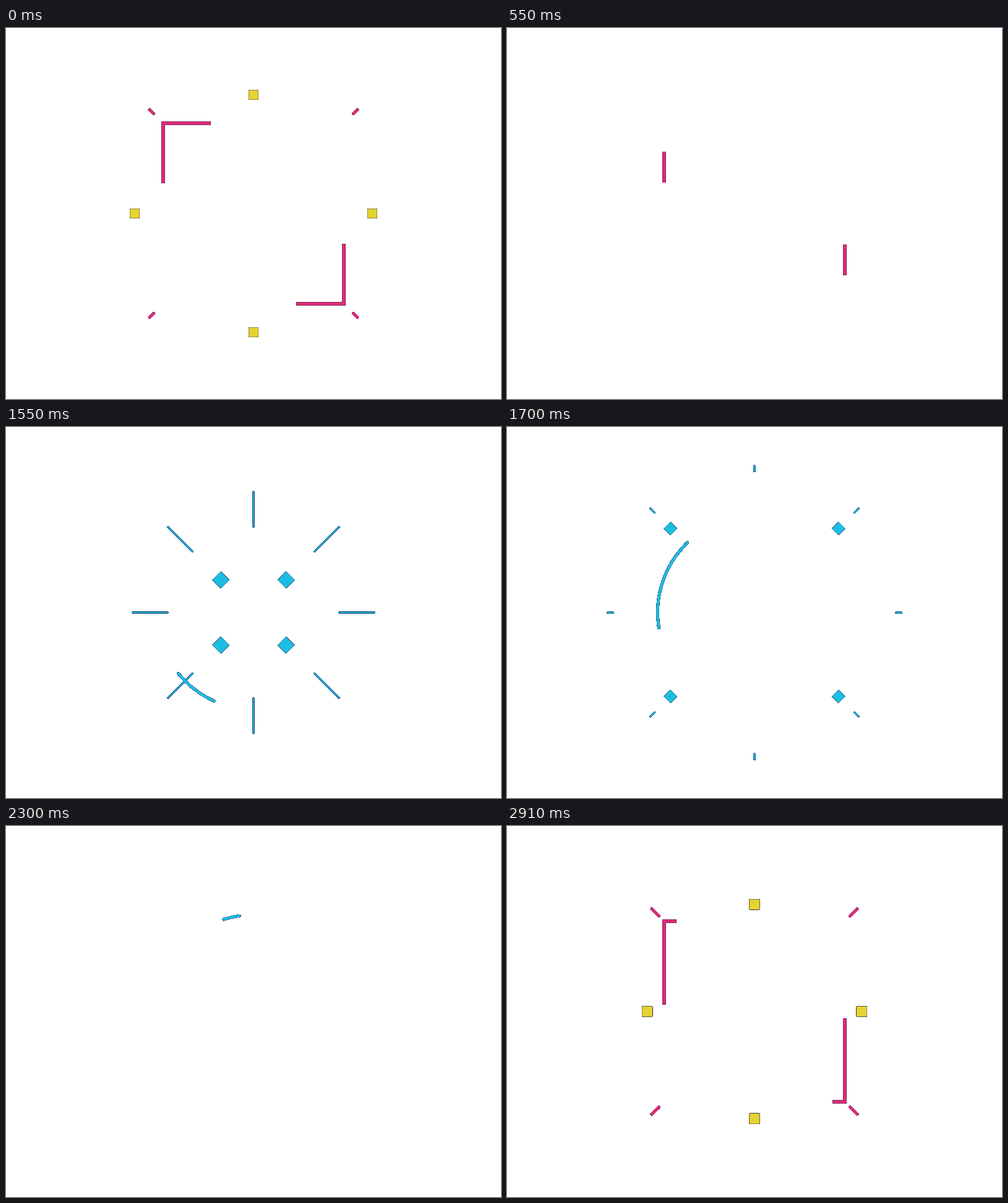
Recreate the animation shown at these times as an HTML page with a canvas. Size 800 by 600 pixels, loop 2940 ms.

```html
<!DOCTYPE html>
<html lang="en">
<head>
<meta charset="utf-8">
<title>Line bursts</title>
<style>
  html, body { margin: 0; width: 100%; height: 100%; overflow: hidden; background: #fff; }
  canvas { display: block; }
</style>
</head>
<body>
<canvas id="stage" width="800" height="600"></canvas>
<script>
const ctx = document.getElementById('stage').getContext('2d', { willReadFrequently: true });
const LOOP = 2940, SCENE = 1220, LEAD = 12;
const EDGE = [38, 33, 63];
const PINK = '#e02b79', YELLOW = '#e4d331', CYAN = '#1dbde3', BLUE = '#22abdc';
const HALF = 146, RADIUS = 156.5;

const progress = (t, start, length) => Math.min(1, Math.max(0, (t - start) / length));
const sinOut = p => Math.sin(p * Math.PI / 2);
const inOut = (p, n) => p < 0.5 ? 0.5 * (2 * p) ** n : 1 - 0.5 * (2 - 2 * p) ** n;

const lineHead = t => inOut(progress(t, -61, 1212), 2.5);
const lineTail = (t, start, length) => inOut(progress(t, start, length), 3.5);

function pen(color, width, cap) {
  ctx.strokeStyle = color;
  ctx.lineWidth = width;
  ctx.lineCap = cap;
}

function around(count, first, draw) {
  for (let i = 0; i < count; i++) {
    ctx.save();
    ctx.rotate(first + i * 2 * Math.PI / count);
    draw();
    ctx.restore();
  }
}

function rays(t, count, first, color, width) {
  const out = progress(t, 0, 464);
  if (out >= 1) return;
  const head = 6 + 231.5 * sinOut(progress(t, -3, 415));
  const tail = Math.min(head, 6 + 231.5 * inOut(out, 2));
  pen(color, width * (0.55 + 0.45 * progress(t, 0, 370)), 'round');
  around(count, first, () => {
    ctx.beginPath();
    ctx.moveTo(tail, 0);
    ctx.lineTo(head, 0);
    ctx.stroke();
  });
}

function squares(t, first, color) {
  const p = progress(t, 173, 377.5);
  if (p <= 0 || p >= 1) return;
  const r = 237 * sinOut(p);
  const side = 19.4 * (1 - p ** 3);
  ctx.fillStyle = color;
  around(4, first, () => ctx.fillRect(r - side / 2, -side / 2, side, side));
}

function arcLine(t) {
  const angle = f => Math.PI * (0.5 + 3 * f);
  pen(CYAN, 4.4, 'round');
  ctx.beginPath();
  ctx.arc(0, 0, RADIUS, angle(lineTail(t, -112, 1445)), angle(lineHead(t)));
  ctx.stroke();
}

function frameLine(t) {
  const period = 4 * HALF;
  const head = 2.5 * period * lineHead(t);
  const tail = 2.5 * period * lineTail(t, -101, 1460);
  const length = Math.max(0, head - tail);
  pen(PINK, 4.2 + 0.8 * progress(t, 220, 150), 'butt');
  ctx.setLineDash([length, period - length]);
  ctx.lineDashOffset = -tail;
  ctx.beginPath();
  ctx.moveTo(-HALF, HALF);
  // The extra side keeps the first corner mitred.
  for (const [x, y] of [[-1, -1], [1, -1], [1, 1], [-1, 1], [-1, -1]]) {
    ctx.lineTo(x * HALF, y * HALF);
  }
  ctx.stroke();
  ctx.setLineDash([]);
}

function roundScene(t) {
  arcLine(t);
  rays(t, 8, 0, BLUE, 3.1);
  squares(t, Math.PI / 4, CYAN);
}

function squareScene(t) {
  frameLine(t);
  rays(t, 4, Math.PI / 4, PINK, 4.6);
  squares(t, 0, YELLOW);
}

// Soft edge pixels blend into a dark tone and become opaque.
function hardenEdges() {
  const image = ctx.getImageData(150, 50, 500, 500);
  const d = image.data;
  for (let i = 0; i < d.length; i += 4) {
    const a = d[i + 3] / 255;
    if (a === 0 || a === 1) continue;
    for (let c = 0; c < 3; c++) d[i + c] = EDGE[c] + (d[i + c] - EDGE[c]) * a;
    d[i + 3] = a > 0.06 ? 255 : 0;
  }
  ctx.putImageData(image, 150, 50);
}

// A scene appears at once, slightly ahead of its start.
function play(scene, time, start) {
  const t = (time - start + LEAD + LOOP) % LOOP - LEAD;
  if (t < SCENE) scene(t);
}

function render(time) {
  ctx.clearRect(0, 0, 800, 600);
  ctx.save();
  ctx.translate(400, 300);
  play(roundScene, time, 1300);
  play(squareScene, time, 2540);
  ctx.restore();
  hardenEdges();
}

let origin = null;
function tick(now) {
  if (origin === null) origin = now;
  render((now - origin) % LOOP);
  requestAnimationFrame(tick);
}
render(0);
requestAnimationFrame(tick);
</script>
</body>
</html>
```
